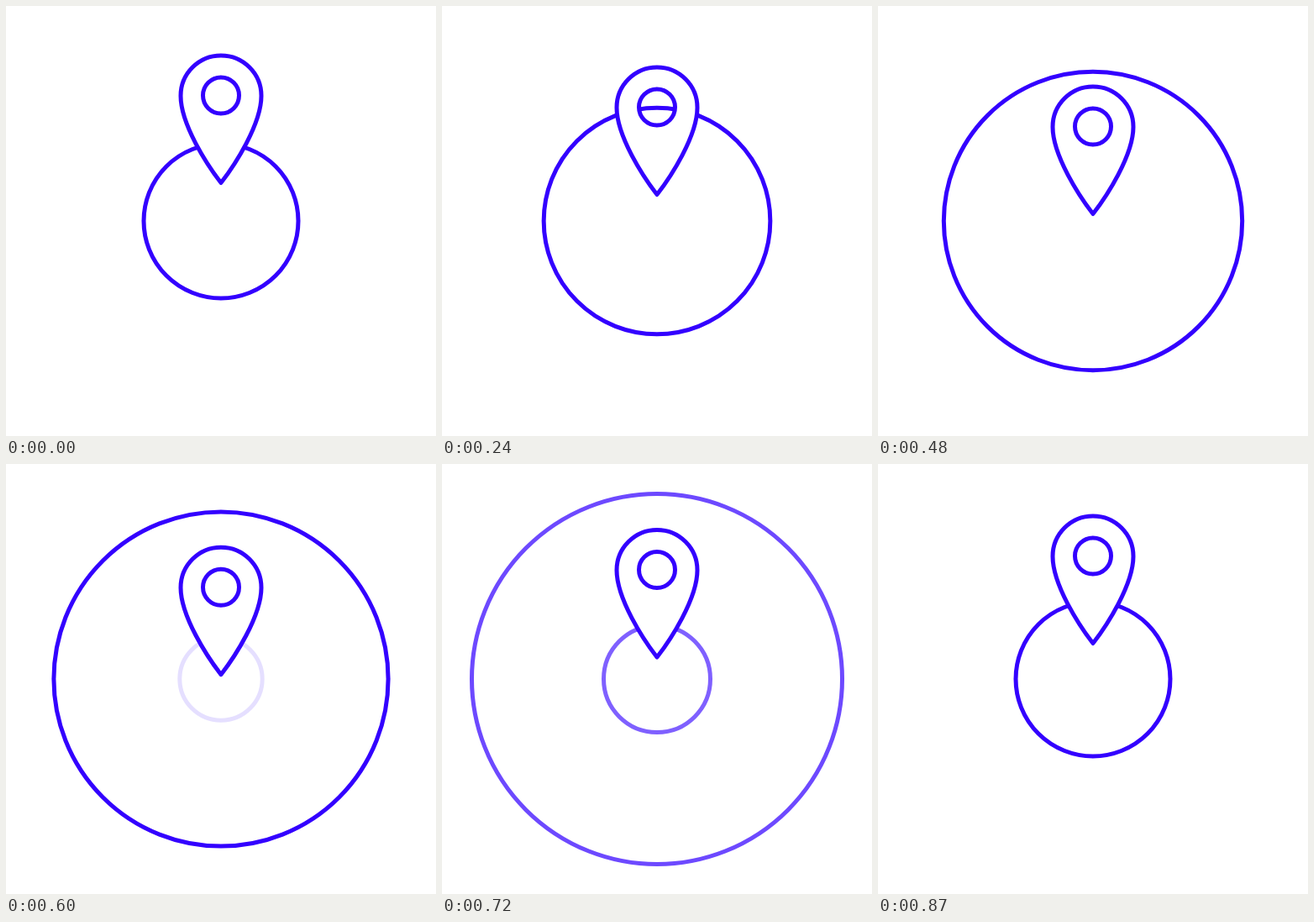
Write an HTML page that moves like this. It is 512 px wide and 512 px high and loops after 0.9 s.

```html
<!DOCTYPE html>
<html lang="en">
<head>
<meta charset="utf-8">
<title>Map pin with ripples</title>
<style>
  html, body { margin: 0; width: 100%; height: 100%; overflow: hidden; background: #fff; }
  svg { display: block; width: 100vw; height: 100vh; }
</style>
</head>
<body>
<svg viewBox="0 0 512 512" fill="none" stroke="#3300ff" stroke-width="5" stroke-linejoin="round">
  <circle id="wave" cx="256" cy="256" r="92"/>
  <circle id="ripple" cx="256" cy="256" r="46" opacity="0"/>
  <!-- the hole in the pin lets the rings show through -->
  <path id="pin" fill="#fff" fill-rule="evenodd"
    d="M208 48A48 48 0 0 1 304 48C304 82 272 131 256 151.5C240 131 208 82 208 48Z
       M234.5 47.5a21.5 21.5 0 1 0 43 0a21.5 21.5 0 1 0 -43 0Z"/>
</svg>
<script>
const LOOP = 900, STEP = 30;
const [wave, ripple, pin] = ["wave", "ripple", "pin"].map(id => document.getElementById(id));

// Pin height: [step, y, speed per step]; it drops, hits the centre and rebounds
const drop = [
  [0, 59, 1.19], [16, 96, 3.44], [19, 105, 2.6],
  [19, 105, -5.8], [24, 78.5, -4.2], [29, 62, -3], [30, 59, -3]
];

const clamp = v => Math.max(0, Math.min(1, v));

function hermite(keys, n) {
  let i = keys.length - 2;
  while (i > 0 && keys[i][0] > n) i--;
  const [x0, y0, v0] = keys[i], [x1, y1, v1] = keys[i + 1];
  const h = x1 - x0, u = (n - x0) / h, w = 1 - u;
  return w * w * (1 + 2 * u) * y0 + u * u * (3 - 2 * u) * y1 + h * u * w * (w * v0 - u * v1);
}

function ring(el, r, alpha) {
  el.setAttribute("r", r.toFixed(2));
  el.setAttribute("opacity", alpha.toFixed(3));
}

function draw(ms) {
  const n = Math.floor((ms % LOOP) / STEP);
  const age = Math.max(0, n - 19);
  ring(wave, 92 + 5.355 * n, clamp((29 - n) / 7));
  ring(ripple, 46.8 + 2.158 * age + 0.236 * age * age, clamp(age / 8));
  pin.setAttribute("transform", `translate(0 ${hermite(drop, n).toFixed(2)})`);
}

let start;
function tick(now) {
  start ??= now;
  draw(Math.max(0, now - start));
  requestAnimationFrame(tick);
}
draw(0);
requestAnimationFrame(tick);
</script>
</body>
</html>
```
